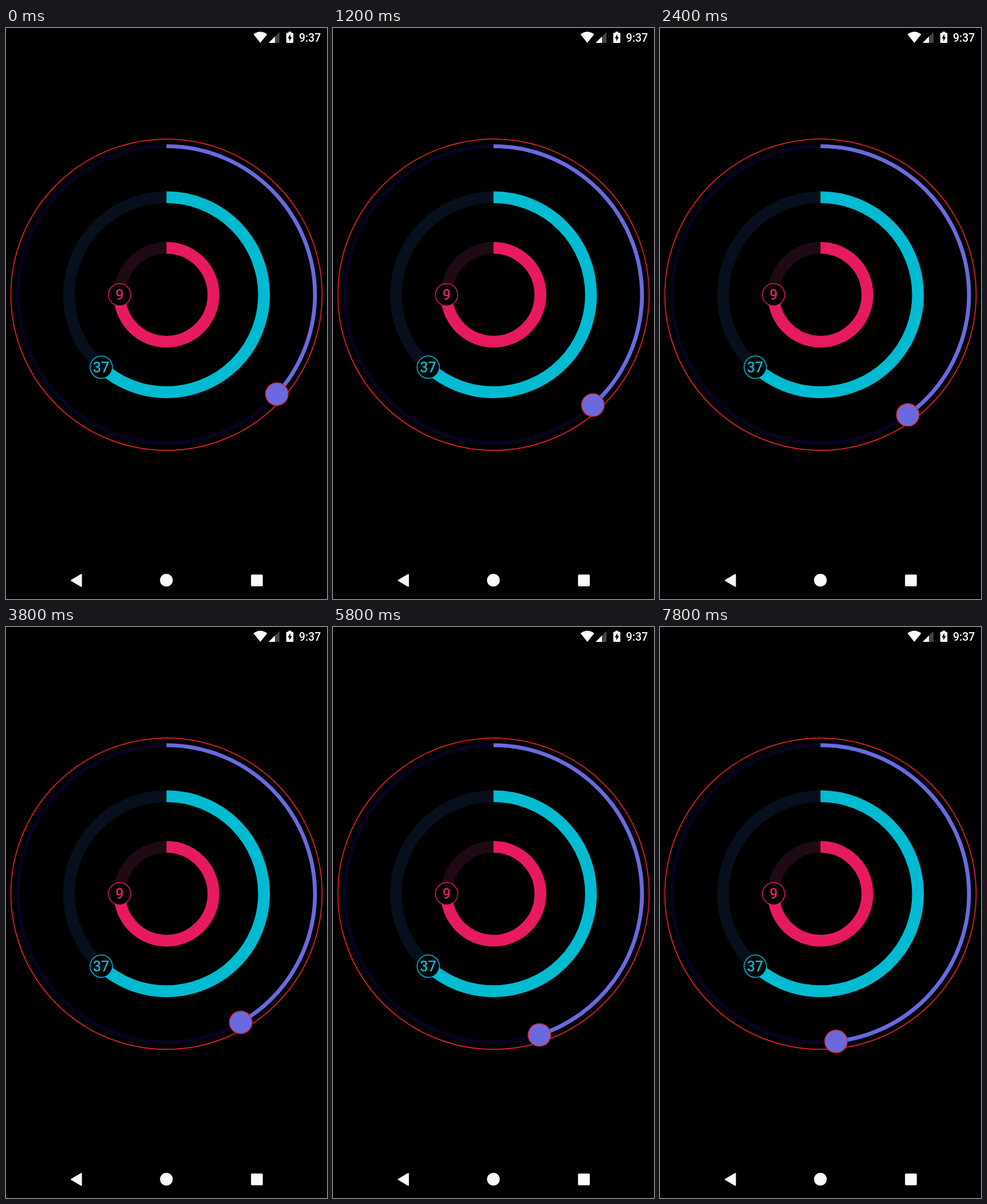
An HTML page that plays this animation: 561x998 px, repeating every 8 s.

```html
<!DOCTYPE html>
<html lang="en">
<head>
<meta charset="utf-8">
<title>Ring clock</title>
<style>
  html, body { margin: 0; width: 100%; height: 100%; overflow: hidden; background: #000; }
  svg { display: block; width: 100%; height: 100%; }
  text { font-family: Roboto, sans-serif; font-weight: 500; }

  .ring { fill: none; }
  .wide { stroke-width: 20.6; }
  .thin { stroke-width: 6.8; }
  .arc { transform: rotate(-90deg); stroke-dasharray: var(--value) 60; }
  .hand { transform: rotate(calc(var(--value) * 6deg)); }
  .knob { stroke-width: 1.5; }
  .label { font-size: 25px; text-anchor: middle; }

  .seconds { --value: 22; animation: tick 8s step-end infinite; }
  .minutes { --value: 37; }
  .hours { --value: 45; }

  /* The ticks run slightly slower than one per second. */
  @keyframes tick {
    0% { --value: 22; }
    10% { --value: 23; }
    22.5% { --value: 24; }
    37.5% { --value: 25; }
    50% { --value: 26; }
    62.5% { --value: 27; }
    75% { --value: 28; }
    87.5%, 100% { --value: 29; }
  }
</style>
</head>
<body>
<svg viewBox="0 0 561 998" preserveAspectRatio="none">
  <rect width="561" height="998"/>

  <g class="status" fill="#fff">
    <path d="M432.5 11Q444.5 2 456.5 11L444.5 26Z"/>
    <path d="M459 26H478V7Z" fill="#444"/>
    <path d="M459 26H470V15Z"/>
    <path d="M493.5 6.5h5v2h2.5q1.200 0 1.200 1.200v15q0 1.300 -1.200 1.300h-10q-1.200 0 -1.200 -1.300v-15q0 -1.200 1.200 -1.200h2.500Z"/>
    <path d="M497 10.500L492.500 18.200H495.200V23.500L499.600 15.800H497Z" fill="#000"/>
    <text x="512" y="23.700" font-size="19.500">9:37</text>
  </g>

  <g transform="translate(280.500 466.200)">
    <circle class="ring" r="272" stroke="#e0222c" stroke-width="1.700"/>

    <g class="seconds">
      <circle class="ring thin" r="259.500" stroke="#07021e"/>
      <circle class="ring thin arc" r="259.500" pathLength="60" stroke="#6a6ade"/>
      <g class="hand">
        <circle class="knob" cy="-259.500" r="19.700" fill="#6a6ade" stroke="#e0222c"/>
      </g>
    </g>

    <g class="minutes">
      <circle class="ring wide" r="170.400" stroke="#060f1b"/>
      <circle class="ring wide arc" r="170.400" pathLength="60" stroke="#00bbd1"/>
      <g class="hand">
        <circle class="knob" cy="-170.400" r="19.500" stroke="#00bbd1"/>
      </g>
      <text class="label" x="-114.200" y="135.600" fill="#18b2cb">37</text>
    </g>

    <g class="hours">
      <circle class="ring wide" r="82" stroke="#1f0914"/>
      <circle class="ring wide arc" r="82" pathLength="60" stroke="#e71a5f"/>
      <g class="hand">
        <circle class="knob" cy="-82" r="19.500" stroke="#e71a5f"/>
      </g>
      <text class="label" x="-82" y="9" fill="#e0215f">9</text>
    </g>
  </g>

  <g class="navigation" fill="#fafafa">
    <path d="M114.500 965.500L131.500 955.500V975.500Z" stroke="#fafafa" stroke-width="2.400" stroke-linejoin="round"/>
    <circle cx="280.300" cy="965.200" r="11.100"/>
    <rect x="428.200" y="955.200" width="20.600" height="20.600" rx="1.800"/>
  </g>
</svg>
</body>
</html>
```
